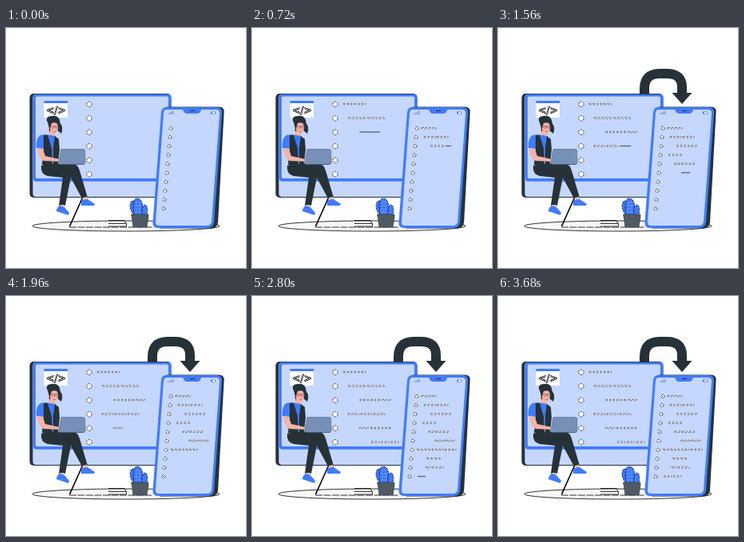
Animation, 300 px wide and 300 px high, one loop 3.76 s. Source, as an HTML page:

```html
<!DOCTYPE html>
<html lang="en">
<head>
<meta charset="utf-8">
<title>Code to phone</title>
<style>
html, body { margin: 0; width: 100%; height: 100%; overflow: hidden; background: #fff; }
svg { display: block; width: 100vw; height: 100vh; }
text { font: bold 12px "DejaVu Sans", sans-serif; text-anchor: middle; fill: #fff; stroke: #000; stroke-width: .7; }
.blue { fill: #407bff; }
.dark { fill: #263238; }
.pale { fill: #c5d6ff; }
.skin { fill: #f4b3a6; }
.white { fill: #fff; }
.ink { fill: none; stroke: #000; stroke-width: .8; }
.dot { fill: #fff; stroke: #000; stroke-width: .7; stroke-dasharray: 2.4 .9; }
.word { fill: #fff; stroke: #000; stroke-width: .5; stroke-dasharray: 3 1.5; }
.word.fresh { fill: #5b6375; stroke: none; }
</style>
</head>
<body>
<svg viewBox="0 0 300 300">
  <ellipse class="ink" cx="150" cy="247.500" rx="117" ry="6.500" style="fill:#f7f7f7"/>

  <!-- monitor -->
  <path class="ink" d="M97 209L79.500 248" style="stroke-width:1.6"/>
  <path class="ink" d="M79 249H183" stroke-dasharray="9 1.500"/>
  <path class="ink" d="M128 240.500H148L150.500 244.500V248H128M128 244.500H150"/>
  <rect class="dark" x="29.500" y="82" width="177" height="130" rx="5"/>
  <rect class="pale" x="33.500" y="83" width="172.500" height="128" rx="4"/>
  <rect class="blue" x="34" y="82.800" width="172.500" height="109" rx="4"/>
  <rect class="pale" x="37" y="85.500" width="166" height="102.500" rx="2"/>
  <rect class="white" x="47.500" y="91" width="29.500" height="21"/>
  <rect class="blue" x="47.500" y="91" width="29.500" height="3"/>
  <text x="62.500" y="106.500">&lt;/&gt;</text>
  <g id="monitor"></g>

  <!-- woman -->
  <path class="dark" d="M48 171L83 169.500Q90 170 92 178L102 212L95 213L81 187L74 222L66 222L71 187L52 185Q43 183 44 172Z"/>
  <path class="skin" d="M67 221H73L72 225H68ZM96 212L101 211L102 215L97 216Z"/>
  <path class="blue" d="M67 222L73 224L79 231L78 234L63 229Q63 225 67 222ZM95 215L102 214L111 220L110 222L94 222Q93 218 95 215Z"/>
  <path class="skin" d="M53 127L62 130L61 138L54 137Z"/>
  <path class="blue" d="M50 133L61 135L66 139L66 151L57 171H48L47 151L38 150Q37 138 43 134Z"/>
  <path class="dark" d="M47 134L52 134L57 150L58 171H45L47 153ZM61 135L66 139L67 152L65 170H59V150Z"/>
  <path class="skin" d="M39 150L46 151L49 160L67 164V167L47 166Q40 162 39 150Z"/>
  <path class="dark" d="M51 116Q50 110 57 110Q65 109 67 115Q67 119 70 123Q71 128 69 132L63 127L54 129Q54 120 51 116Z"/>
  <ellipse class="skin" cx="60" cy="124.500" rx="5.200" ry="7.500"/>
  <path class="dark" d="M52 113Q60 107 66 114L65 120Q62 117 57 119L55 126Q52 121 52 113Z"/>
  <path d="M57 122.500H60.500V125H57ZM62 122.500H65V125H62ZM60.500 123H62M59 129Q61 130.500 62.500 129" fill="none" stroke="#8e4757" stroke-width=".6"/>
  <path class="dark" d="M58 169.500H97V171H58Z"/>
  <path fill="#7790b8" stroke="#46587a" stroke-width=".5" d="M69 151.500H97Q98.500 152 98.700 153L99 168Q99 170.500 97 170.500H67L66 168Z"/>

  <!-- plant -->
  <g class="blue" stroke="#000" stroke-width=".7" stroke-dasharray="3 1">
    <path d="M160 234Q153 226 156 218Q158 214 161 218L162 227Z"/>
    <path d="M160 234Q157 213 164 213Q172 213 172 234Z"/>
    <path d="M170 234Q169 222 174 221Q178 222 176 234Z"/>
  </g>
  <path d="M163 217V233M167 217V233" fill="none" stroke="#a2bdff" stroke-width=".8" stroke-dasharray="2 2"/>
  <path d="M156.500 233H178V237L176 249H159L157.500 238Z" fill="#505a64" stroke="#333" stroke-width=".6"/>

  <!-- arrow -->
  <path id="shaft" d="M183 83V76Q183 57 202 57H211Q230 57 230 74V82" fill="none" stroke="#263238" stroke-width="12" pathLength="100"/>
  <path id="head" class="dark" d="M217.500 81H242.500L230 95Z"/>

  <!-- phone -->
  <path class="dark" d="M202 98.500H266Q273.500 98.500 272.500 106L265 243Q264 250 257 250.500H193L184 245L196 103Q198 98.500 202 98.500Z"/>
  <path class="blue" d="M200 99H263Q270.500 99 270 106L260 243Q259 250 252 250H190Q183 250 183.500 243L194 105Q195 99 200 99Z"/>
  <path class="pale" d="M201 102H221Q223 107 226 107H239Q243 107 244 102H262Q267.500 102 267 107L257 242Q256.500 247 251 247H191Q186.500 247 187 242L197 106Q197.500 102 201 102Z"/>
  <path d="M203 108V106.500M205 108V105.500M207 108V104.500M209 108V103.500" stroke="#6f86b8"/>
  <rect class="blue" x="256" y="104.500" width="6" height="3" rx="1"/>
  <rect class="white" x="258" y="105" width="3" height="2"/>
  <path d="M230 103.500H236" stroke="#263238"/>
  <g id="phone"></g>
</svg>
<script>
const LOOP = 3760, FRESH = 130;
const el = id => document.getElementById(id);
const show = (node, on) => node.style.display = on ? '' : 'none';

function add(parent, name, attrs) {
  const node = document.createElementNS('http://www.w3.org/2000/svg', name);
  for (const key in attrs) node.setAttribute(key, attrs[key]);
  return parent.appendChild(node);
}

// One digit per line: its indent level and its number of words.
function codeList({ id, x, y, r, lean, pitch, tab, pad, gap, indents, counts, widths, start, step }) {
  const parent = el(id), words = [];
  widths.forEach((width, row) => {
    const cx = x - lean * row, cy = y + pitch * row, count = +counts[row];
    add(parent, 'circle', { class: 'dot', cx, cy, r });
    const left = cx + Math.max(3 * r, pad + tab * indents[row]);
    const room = width - gap * (count - 1);
    // Lines of two words swap which one is longer.
    const first = count === 2 ? .5 - .2 * Math.cos(row * Math.PI / 2) : 1 / count;
    for (let i = 0; i < count; i++) {
      const share = count === 2 && i ? 1 - first : first;
      const from = i ? left + i * (room * first + gap) : left;
      const node = add(parent, 'rect', { x: from, y: cy - .9, width: room * share, height: 1.3 });
      words.push({ node, at: start + step * words.length });
    }
  });
  return words;
}

const words = [
  ...codeList({
    id: 'monitor', x: 104, y: 95.300, r: 3.2, lean: 0, pitch: 17.5, tab: 14.5, pad: 1.5, gap: 2.5,
    indents: '012123', counts: '122323', widths: [28, 46, 39, 46, 39, 34], start: 50, step: 215
  }),
  ...codeList({
    id: 'phone', x: 206, y: 125.400, r: 2, lean: 1, pitch: 11.15, tab: 9, pad: 1, gap: 2,
    indents: '0121230221', counts: '1222222222', widths: [18, 30, 26, 17, 25, 24, 49, 18, 22, 22], start: 60, step: 160
  })
];

function draw(t) {
  for (const { node, at } of words) {
    show(node, t >= at);
    node.setAttribute('class', t < at + FRESH ? 'word fresh' : 'word');
  }
  const grown = Math.min(1, Math.max(0, (t - 900) / 400));
  show(el('shaft'), grown > 0);
  show(el('head'), grown === 1);
  el('shaft').setAttribute('stroke-dasharray', `${100 * grown} 200`);
}

const begin = performance.now();
function tick() {
  draw((performance.now() - begin) % LOOP);
  requestAnimationFrame(tick);
}
tick();
</script>
</body>
</html>
```
